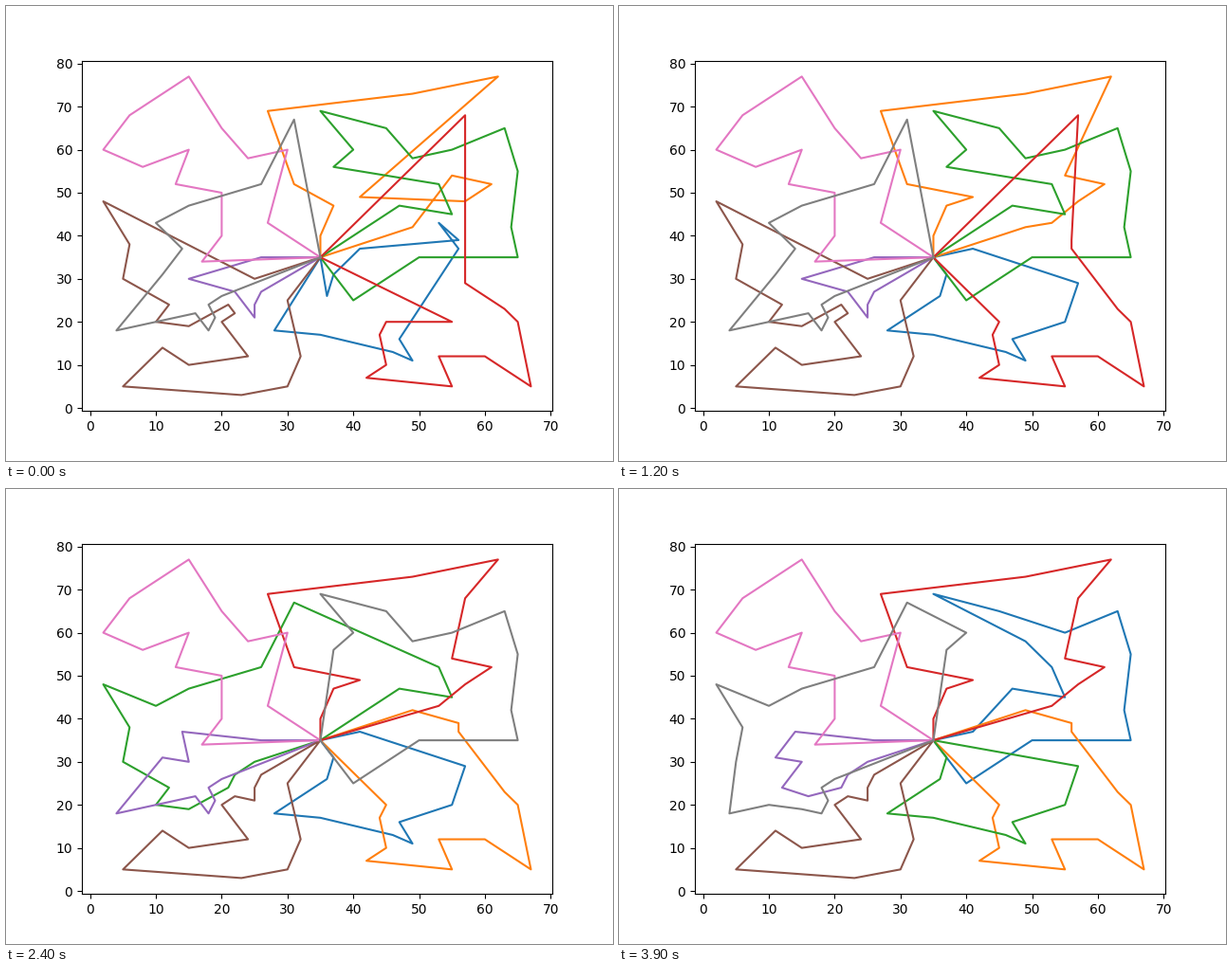
A matplotlib script for the animation above (4200 ms loop, 640 by 480 pixels).

```python
import matplotlib.pyplot as plt
from matplotlib.animation import FuncAnimation

# Eight delivery tours leave one depot and are improved step by step:
# two tours trade tails, and single tours get their stops reordered.
DEPOT = (35, 35)

blue = [(36, 26), (37, 31), (41, 37), (56, 39), (53, 43), (56, 37),
        (47, 16), (49, 11), (46, 13), (35, 17), (28, 18)]
orange = [(49, 42), (55, 54), (61, 52), (57, 48), (41, 49), (62, 77),
          (49, 73), (27, 69), (31, 52), (37, 47), (35, 40)]
green = [(47, 47), (55, 45), (53, 52), (37, 56), (40, 60), (35, 69),
         (45, 65), (49, 58), (55, 60), (63, 65), (65, 55), (64, 42),
         (65, 35), (50, 35), (40, 25)]
red = [(57, 68), (57, 29), (63, 23), (65, 20), (67, 5), (60, 12), (53, 12),
       (55, 5), (42, 7), (45, 10), (44, 17), (45, 20), (55, 20)]
purple = [(26, 35), (15, 30), (22, 27), (25, 21), (25, 24), (26, 27)]
brown = [(30, 25), (32, 12), (30, 5), (23, 3), (5, 5), (11, 14), (15, 10),
         (24, 12), (20, 20), (22, 22), (21, 24), (15, 19), (10, 20),
         (12, 24), (5, 30), (6, 38), (2, 48), (25, 30)]
pink = [(17, 34), (20, 40), (20, 50), (13, 52), (15, 60), (8, 56), (2, 60),
        (6, 68), (15, 77), (20, 65), (24, 58), (30, 60), (27, 43)]
gray = [(31, 67), (26, 52), (15, 47), (10, 43), (14, 37), (11, 31), (4, 18),
        (16, 22), (18, 18), (19, 21), (18, 24), (20, 26)]

tours = [blue, orange, green, red, purple, brown, pink, gray]


def position_after(tour, stop):
    return 0 if stop == DEPOT else tour.index(stop) + 1


def swap(tour_a, stop_a, tour_b, stop_b):
    """Trade everything that follows stop_a and stop_b."""
    i, j = position_after(tour_a, stop_a), position_after(tour_b, stop_b)
    tour_a[i:], tour_b[j:] = tour_b[j:], tour_a[i:]


def move(tour, first, after, last=None, flip=False):
    """Reinsert the run first..last behind another stop."""
    i, j = tour.index(first), tour.index(last or first) + 1
    run = tour[i:j]
    del tour[i:j]
    k = position_after(tour, after)
    tour[k:k] = run[::-1] if flip else run


def untangle_blue_orange():
    move(blue, (36, 26), (28, 18), last=(37, 31))
    move(blue, (56, 39), (53, 43))
    move(orange, (41, 49), (31, 52))
    move(orange, (55, 54), (49, 42), last=(57, 48), flip=True)
    swap(orange, (49, 42), blue, (53, 43))


def share_southeast():
    move(blue, (55, 20), (57, 29))
    swap(blue, (55, 20), red, (56, 37))


def share_southwest():
    move(red, (57, 68), (55, 54))
    swap(purple, (22, 27), brown, (22, 22))


def share_west():
    move(purple, (22, 27), (15, 30), last=(2, 48), flip=True)
    swap(purple, (15, 30), gray, (10, 43))


def share_north():
    move(purple, (14, 37), (26, 35))
    swap(green, (53, 52), gray, DEPOT)


def refine_northeast():
    move(blue, (49, 58), (53, 52))
    swap(purple, (11, 31), gray, (5, 30))


def refine_west():
    move(purple, (11, 31), (14, 37))
    swap(purple, (12, 24), gray, (4, 18))


STEPS = [
    untangle_blue_orange,
    lambda: swap(orange, (49, 42), blue, (41, 37)),
    lambda: swap(blue, (41, 37), red, (57, 68)),
    share_southeast,
    lambda: swap(orange, (49, 42), red, (57, 68)),
    share_southwest,
    share_west,
    share_north,
    lambda: swap(blue, (41, 37), green, DEPOT),
    lambda: swap(blue, (15, 19), purple, (16, 22)),
    lambda: swap(blue, (53, 52), gray, (40, 60)),
    refine_northeast,
    refine_west,
]


def snapshot():
    return [[DEPOT, *tour, DEPOT] for tour in tours]


history = [snapshot()]
for step in STEPS:
    step()
    history.append(snapshot())

fig, ax = plt.subplots(figsize=(6.4, 4.8), dpi=100)
lines = [ax.plot(*zip(*path))[0] for path in history[0]]


def draw(frame):
    for line, path in zip(lines, history[frame]):
        line.set_data(*zip(*path))
    return lines


anim = FuncAnimation(fig, draw, frames=len(history), interval=300,
                     repeat=True, repeat_delay=0)
plt.show()
```
